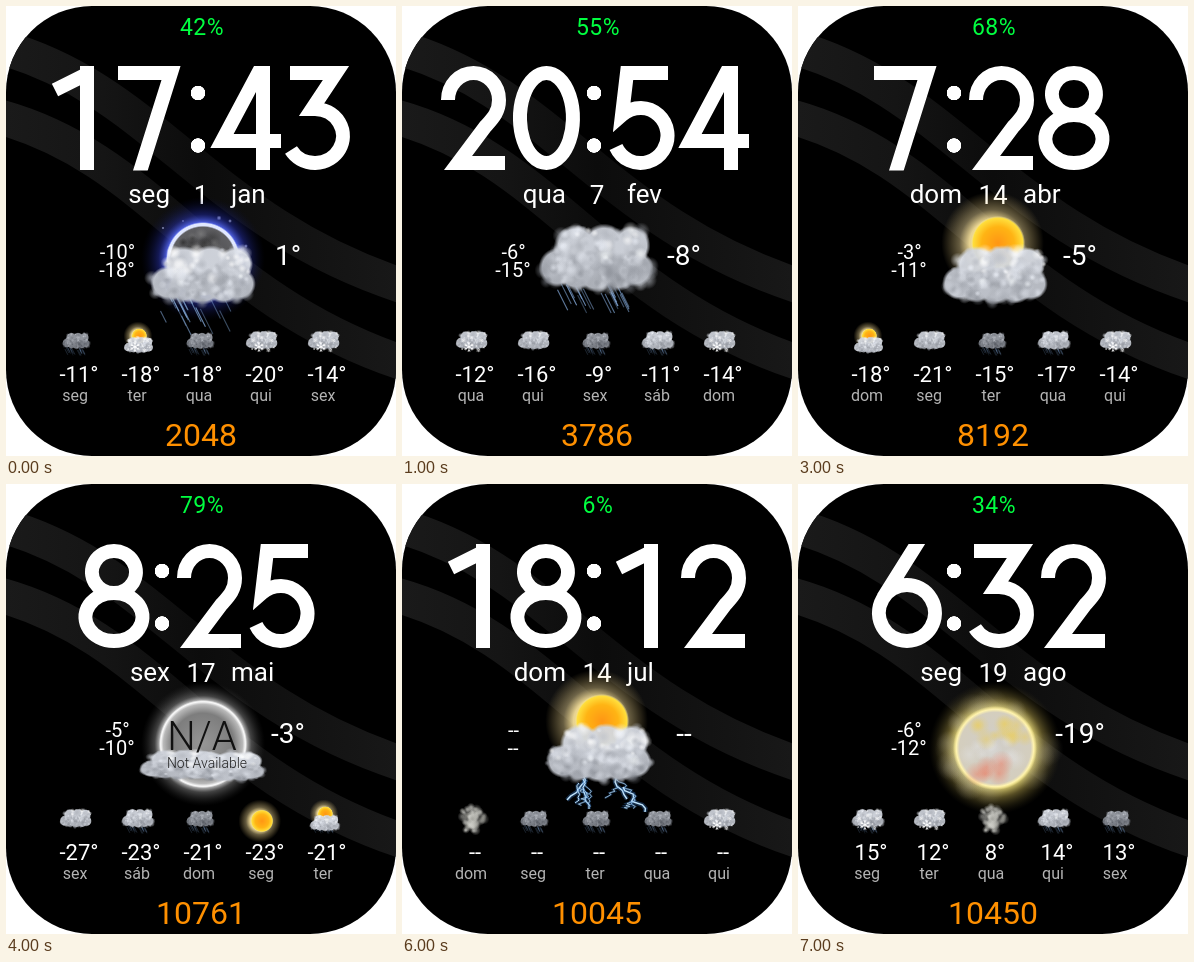
An HTML page with a canvas for the animation above (8000 ms loop, 390 by 450 pixels).

```html
<!DOCTYPE html>
<html lang="pt">
<head>
<meta charset="utf-8">
<title>Mostrador com previsão do tempo</title>
<style>
html, body { margin: 0; width: 390px; height: 450px; overflow: hidden; background: #fff; }
canvas { display: block; }
</style>
</head>
<body>
<canvas id="face" width="390" height="450"></canvas>
<script>
const ctx = document.getElementById('face').getContext('2d');
const TAU = Math.PI * 2;
const WEEK = ['dom', 'seg', 'ter', 'qua', 'qui', 'sex', 'sáb'];

// time, battery, weekday, day, month, steps, main weather, "now high low", forecast temperatures, forecast icons
const SCREENS = [
  ['17:43', 42, 1, 1, 'jan', 2048, 'stars moon rain low', '1 -10 -18', '-11 -18 -18 -20 -14', 'rPrss'],
  ['20:54', 55, 3, 7, 'fev', 3786, 'drizzle cloud', '-8 -6 -15', '-12 -16 -9 -11 -14', 'scrbs'],
  ['18:34', 22, 3, 6, 'mar', 5323, 'cloud snow', '-23 -12 -21', '-15 -6 -13 -12 -14', 'swcrs'],
  ['7:28', 68, 0, 14, 'abr', 8192, 'sun low', '-5 -3 -11', '-18 -21 -15 -17 -14', 'pcrbs'],
  ['8:25', 79, 5, 17, 'mai', 10761, 'missing', '-3 -5 -10', '-27 -23 -21 -23 -21', 'cbrSq'],
  ['23:05', 62, 6, 15, 'jun', 12500, 'drizzle cloud sleet', '-23 -21 -29', '15 23 19 24 17', 'pppbf'],
  ['18:12', 6, 0, 14, 'jul', 10045, 'sun bolt low', '-- -- --', '-- -- -- -- --', 'frrrs'],
  ['6:32', 34, 1, 19, 'ago', 10450, 'haze', '-19 -6 -12', '15 12 8 14 13', 'msfbr'],
];
const ICONS = {
  r: 'drizzle dark', s: 'cloud snow', c: 'cloud', S: 'clear', p: 'sun low', q: 'sun drizzle low',
  P: 'sun low snow', b: 'drizzle cloud', f: 'fog', w: 'dusk', m: 'drizzle cloud snow',
};

const DIGITS = [
  'M36.5,7a26.5,45 0 1 1-.1,0z',
  'M13,24L45,8M45,0V104',
  'M10,34A25.5,27 0 0 1 61,34C61,46 55,52 47,61L20,97H67',
  'M8,7H54L30,43H33A28,27 0 1 1 9,84',
  'M53,104V0M53,-2L12,75H71',
  'M62,7H21L16,49Q24,42 35,42A27,27.5 0 1 1 10,81',
  'M50,-5L13,54M37,41a28,28 0 1 1-.1,0z',
  'M4,7H57L24,112',
  'M36,7a22,21 0 1 1-.1,0zM36,49a28.5,24 0 1 1-.1,0z',
].map(d => new Path2D(d));

const LUMPS = [[-38, 10, 18], [-20, -9, 21], [8, -9, 22], [35, -11, 18], [39, 11, 17], [0, 13, 20], [-20, 14, 17], [22, 14, 18]];

let seed;
const rand = (lo = 0, hi = 1) => {
  seed = seed * 16807 % 2147483647;
  return lo + (hi - lo) * seed / 2147483647;
};

function text(str, x, y, size, color = '#fff', align = 'center', weight = 400) {
  ctx.font = `${weight} ${size}px Roboto, sans-serif`;
  ctx.textAlign = align;
  ctx.fillStyle = color;
  ctx.fillText(str, x, y);
}

// Round spot: colour stops are [offset, "r,g,b", alpha]
function spot(x, y, r, ...stops) {
  const g = ctx.createRadialGradient(x, y, 0, x, y, r);
  for (const [at, rgb, alpha] of stops) g.addColorStop(at, `rgba(${rgb},${alpha})`);
  ctx.fillStyle = g;
  ctx.fillRect(x - r, y - r, 2 * r, 2 * r);
}
const puff = (x, y, r, rgb, alpha, core = 0) => spot(x, y, r, [0, rgb, alpha], [core, rgb, alpha], [1, rgb, 0]);

function cloud(x, y, sx, sy, light) {
  ctx.save();
  ctx.translate(x, y);
  ctx.scale(sx, sy);
  const grey = v => `${v - 4 | 0},${v | 0},${v + 8 | 0}`;
  for (const [px, py, r] of LUMPS) puff(px, py, r * 1.05, grey(light - py), 0.95, 0.8);
  for (let i = 0; i < 170; i++) {
    const [px, py, r] = LUMPS[i % LUMPS.length];
    const a = rand(0, TAU), d = r * Math.sqrt(rand()), dy = py + d * Math.sin(a);
    puff(px + d * Math.cos(a), dy, rand(3, 9), grey(light + 8 - dy * 1.4 + rand(-55, 55)), 0.55, 0.2);
  }
  ctx.restore();
}

function sun(x, y, r) {
  spot(x - r * 0.2, y, r * 1.9, [0, '255,235,170', 1], [0.45, '255,232,160', 0.9], [0.65, '255,230,160', 0.4], [1, '255,220,130', 0]);
  spot(x, y, r, [0, '255,150,20', 1], [0.6, '255,180,20', 1], [0.92, '255,222,60', 1], [1, '255,240,150', 0]);
}

function line(points, width, color) {
  ctx.beginPath();
  points.forEach(([x, y]) => ctx.lineTo(x, y));
  ctx.lineWidth = width;
  ctx.strokeStyle = color;
  ctx.stroke();
}

function streaks(bottom) {
  for (let i = 0; i < 20; i++) {
    const x = rand(-42, 26), y = rand(18, bottom - 18), len = rand(10, 26);
    const end = Math.min(bottom, y + len);
    line([[x, y], [x + (end - y) * 0.5, end]], 1.1, `rgba(125,160,205,${rand(0.4, 0.9)})`);
  }
}

function flake(x, y, r) {
  ctx.save();
  ctx.translate(x, y);
  for (let i = 0; i < 6; i++) {
    ctx.rotate(TAU / 6);
    line([[0, 0], [0, -r]], r / 7 + 0.5, '#fff');
    line([[-r * 0.26, -r * 0.88], [0, -r * 0.6], [r * 0.26, -r * 0.88]], r / 8 + 0.3, '#fff');
  }
  ctx.restore();
}

function bolt(x, y, toX, toY, width) {
  const points = [];
  for (let i = 0; i <= 7; i++) {
    const k = i / 7, wobble = i % 7 ? rand(-4, 4) : 0;
    points.push([x + (toX - x) * k + wobble, y + (toY - y) * k]);
  }
  line(points, width * 3, 'rgba(60,130,210,.35)');
  line(points, width, '#bfe2fa');
  if (width > 1) for (const i of [2, 4]) bolt(...points[i], points[i][0] + rand(-14, 14), toY - rand(0, 8), 0.7);
}

const PARTS = {
  stars() {
    for (const [x, y, r] of [[18, -43, 1.6], [29, -40, 1.2], [-38, -33, 1], [45, -15, 1.2], [-18, -40, 0.8]])
      puff(x, y, r * 1.6, '230,235,255', 1);
  },
  moon() {
    spot(2, -2, 62, [0, '70,90,255', 1], [0.58, '90,110,255', 0.9], [0.72, '40,50,170', 0.5], [1, '10,15,60', 0]);
    spot(2, -2, 37, [0, '70,70,72', 1], [0.86, '95,95,98', 1], [0.9, '225,232,255', 1], [0.96, '225,232,255', 1], [1, '190,200,255', 0]);
    for (let i = 0; i < 45; i++) {
      const a = rand(0, TAU), d = 26 * Math.sqrt(rand()), v = rand(20, 150) | 0;
      puff(2 + d * Math.cos(a), -2 + d * Math.sin(a), rand(3, 9), `${v},${v},${v}`, 0.5);
    }
  },
  sun: () => sun(5, -18, 27),
  clear: () => sun(0, 7, 40),
  cloud: () => cloud(-1, -4, 1.01, 1.04, 196),
  dark: () => cloud(0, -2, 0.86, 0.9, 140),
  low: () => cloud(2, 13, 0.93, 0.9, 206),
  rain: () => streaks(74),
  drizzle: () => streaks(52),
  snow: () => [[-11, 21, 18], [-30, -2, 7], [-1, -12, 6], [33, -2, 7], [23, 33, 7], [42, 23, 3], [-35, 29, 3], [16, 18, 3]].forEach(f => flake(...f)),
  sleet: () => [[-12, 9, 18], [30, 2, 11], [-30, -10, 6], [17, 21, 6], [-29, 12, 4]].forEach(f => flake(...f)),
  bolt() {
    bolt(-6, 34, -30, 61, 1.5);
    bolt(-14, 40, -8, 70, 1.2);
    bolt(-18, 44, -22, 64, 1);
    bolt(14, 30, 30, 60, 1.5);
    bolt(26, 48, 48, 73, 1.5);
  },
  fog() {
    for (let i = 0; i < 80; i++) {
      const a = rand(0, TAU), d = rand(0, 46), v = rand(150, 235) | 0;
      puff(d * Math.cos(a), d * Math.sin(a), rand(8, 20), `${v},${v},${v - 6}`, 0.5, 0.2);
    }
  },
  dusk() {
    cloud(0, -2, 0.9, 0.85, 115);
    for (let i = 0; i < 10; i++) puff(rand(-34, 34), rand(-18, 20), 15, '165,105,60', 0.45);
    puff(18, 18, 9, '225,50,40', 0.8);
  },
  haze() {
    spot(2, 9, 66, [0, '255,240,150', 1], [0.6, '245,230,130', 0.9], [0.75, '190,170,80', 0.45], [1, '80,70,30', 0]);
    for (let i = 0; i < 26; i++) {
      const a = rand(0, TAU), d = rand(36, 52);
      puff(2 + d * Math.cos(a), 9 + d * 0.85 * Math.sin(a), rand(8, 18), '165,160,140', 0.25);
    }
    spot(2, 9, 42, [0, '208,205,200', 1], [0.85, '212,206,190', 1], [0.92, '255,243,175', 1], [1, '255,240,150', 0]);
    for (let i = 0; i < 26; i++) {
      const y = rand(-26, 30), half = Math.sqrt(1000 - y * y);
      const rgb = y < -8 ? '235,205,90' : y > 12 ? '235,120,95' : '225,225,225';
      puff(2 + rand(-half, half), 9 + y, rand(6, 13), rgb, 0.5);
    }
  },
  missing() {
    spot(2, 5, 62, [0, '255,255,255', 1], [0.68, '255,255,255', 0.85], [0.78, '190,190,190', 0.35], [1, '80,80,80', 0]);
    spot(2, 5, 44, [0, '150,150,150', 1], [0.7, '125,125,125', 1], [0.9, '185,185,185', 1], [0.96, '250,250,250', 1], [1, '255,255,255', 0]);
    cloud(-22, 25, 0.7, 0.46, 200);
    cloud(24, 27, 0.7, 0.46, 205);
    text('N/A', 1, 11, 40, '#111', 'center', 300);
    text('Not Available', 6, 29, 14, '#222', 'center', 300);
  },
};

function weather(parts, x, y, scale) {
  seed = 4711;
  ctx.save();
  ctx.translate(x, y);
  ctx.scale(scale, scale);
  for (const part of parts.split(' ')) PARTS[part]();
  ctx.restore();
}

function clock(time) {
  let x = time.length > 4 ? 36 : 72;
  for (const c of time) {
    ctx.save();
    ctx.translate(x, 60);
    ctx.beginPath();
    ctx.rect(-2, 0, 76, 104.5);
    ctx.clip();
    ctx.lineWidth = 14;
    ctx.strokeStyle = '#fff';
    if (c === ':') {
      puff(12, 27, 7.5, '255,255,255', 1, 0.93);
      puff(12, 79.5, 7.5, '255,255,255', 1, 0.93);
    } else ctx.stroke(DIGITS[c]);
    ctx.restore();
    x += c === ':' ? 24 : 72;
  }
}

function background() {
  ctx.clearRect(0, 0, 390, 450);
  ctx.beginPath();
  ctx.roundRect(0, 0, 390, 450, 86);
  ctx.fillStyle = '#000';
  ctx.fill();
  ctx.save();
  ctx.clip();
  const fade = ctx.createLinearGradient(0, 0, 390, 0);
  ['#1a1a1a', '#151515', '#0c0c0c', '#121212', '#181818'].forEach((c, i) => fade.addColorStop(i / 4, c));
  ctx.lineWidth = 35;
  ctx.strokeStyle = fade;
  ctx.stroke(new Path2D('M-10,40C150,82 200,217 400,281'));
  ctx.stroke(new Path2D('M-10,110C150,152 200,292 400,358'));
  ctx.restore();
}

const degrees = t => t === '--' ? t : t + '°';

function draw([time, battery, weekday, day, month, steps, main, temps, forecast, icons]) {
  background();
  ctx.letterSpacing = '0.5px';
  text(battery + '%', 196, 29, 23, '#00ff40');
  ctx.letterSpacing = '0px';
  clock(time);
  text(WEEK[weekday], 164, 197, 26, '#fff', 'right');
  text(day, 195, 198, 26);
  text(month, 225, 197, 26, '#fff', 'left');

  weather(main, 195, 255, 1);
  const [now, high, low] = temps.split(' ').map(degrees);
  text(high, 111.5, 253, 20);
  text(low, 111, 271, 20);
  text(now, 282, 259, 28);

  forecast.split(' ').forEach((t, i) => {
    const x = 62 * i;
    weather(ICONS[icons[i]], 70 + x, 335, 0.28);
    text(degrees(t), 73 + x, 376, 22);
    text(WEEK[(weekday + i) % 7], 69 + x, 395, 16, '#b4b4b4');
  });
  text(steps, 195, 440, 32, '#ff9000');
}

let start, shown;
function tick(now) {
  start ??= now;
  const index = Math.floor((now - start) / 1000) % SCREENS.length;
  if (index !== shown) draw(SCREENS[shown = index]);
  requestAnimationFrame(tick);
}
requestAnimationFrame(tick);
</script>
</body>
</html>
```
